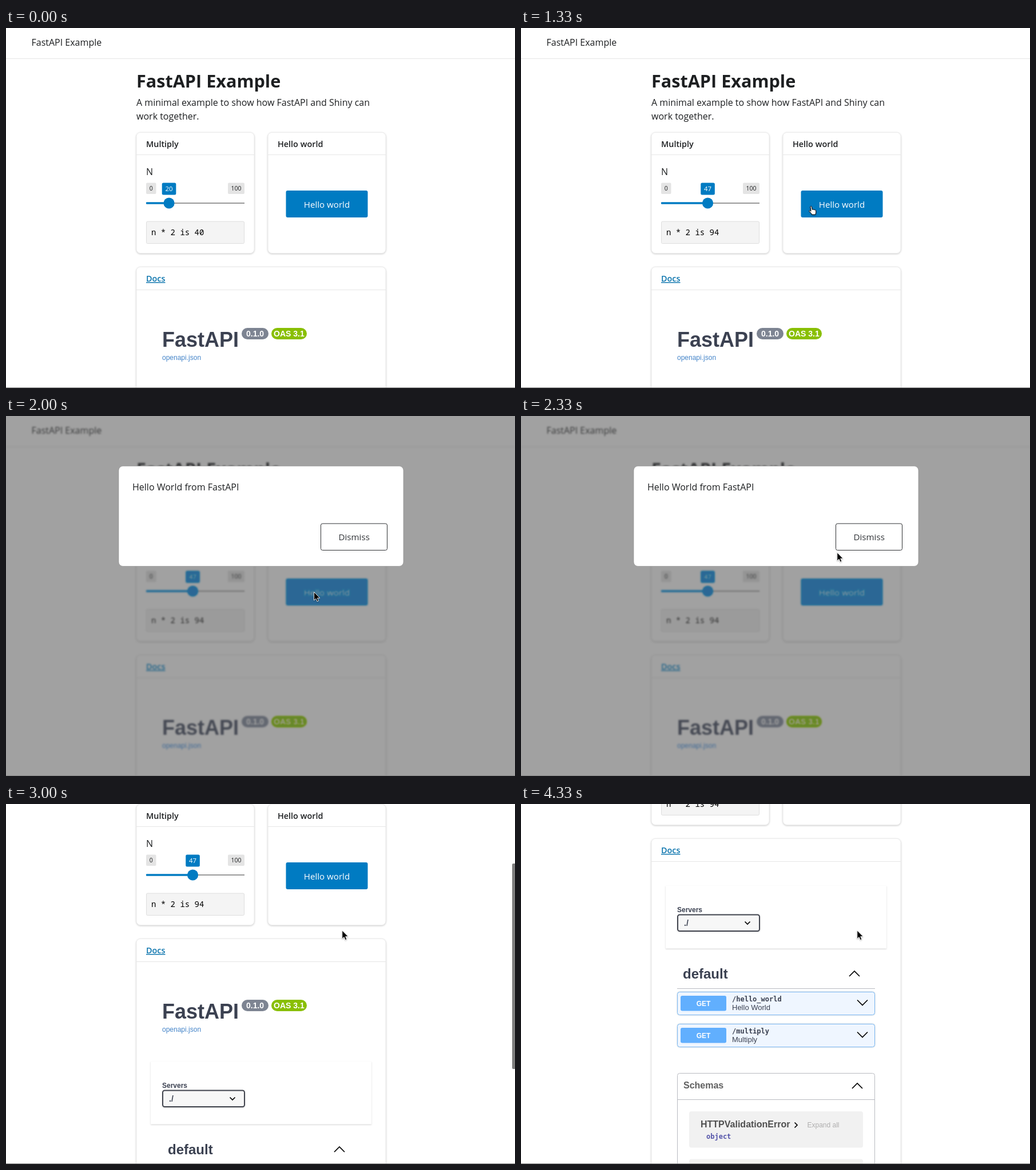
An HTML page for the animation above (5510 ms loop, 890 px wide and 629 px high).

```html
<!DOCTYPE html>
<html lang="en">
<head>
<meta charset="utf-8">
<title>FastAPI Example</title>
<style>
  html, body { margin: 0; width: 100%; height: 100%; overflow: hidden; background: #fff; }
  svg { position: absolute; left: 0; top: 0; width: 890px; height: 629px; }
  text { font: 16px "Open Sans", sans-serif; fill: #1d1f21; white-space: pre; }
  .title { font-size: 30.6px; font-weight: 700; }
  .head { font-size: 14.4px; font-weight: 600; }
  .button { font-size: 15.1px; font-weight: 500; text-anchor: middle; }
  .tick { font-size: 10.5px; text-anchor: middle; }
  .value { font-size: 11.4px; text-anchor: middle; }
  .white { fill: #fff; }
  .blue { fill: #007bc2; }
  .code { font: 14px "Noto Sans Mono", monospace; fill: #000; }
  .card { fill: #fff; stroke: #ebebeb; filter: drop-shadow(0 1.5px 1.5px rgba(0,0,0,.2)); }
  .rule { stroke: #e6e6e6; }
  .api text { font-family: "Liberation Sans", Arial, sans-serif; fill: #3b4151; }
  .api .b { font-weight: 700; }
  .api .white { fill: #fff; }
  .api .mono { font: 700 12px "DejaVu Sans Mono", monospace; }
  .s12 { font-size: 12px; }
  .s13 { font-size: 13px; }
  .s14 { font-size: 14px; }
  .box { fill: none; stroke: #b9bbc1; }
  .chevron { fill: none; stroke: #000; stroke-width: 1.7; }
  .raised { fill: #fff; filter: drop-shadow(0 1px 1px rgba(0,0,0,.18)); }
</style>
</head>
<body>
<svg id="page" viewBox="0 0 890 629">
  <rect width="890" height="629" fill="#fff"/>
  <g id="scroll">
    <text x="44.5" y="31">FastAPI Example</text>
    <path class="rule" d="M0 53.5H890"/>
    <text class="title" x="228" y="104">FastAPI Example</text>
    <text x="228" y="136.3">A minimal example to show how FastAPI and Shiny can</text>
    <text x="228" y="160.3">work together.</text>

    <rect class="card" x="228" y="182.5" width="206" height="211" rx="7"/>
    <path class="rule" d="M228 221.5H434"/>
    <text class="head" x="245" y="208">Multiply</text>
    <text x="245" y="256.5">N</text>
    <rect x="245" y="270.5" width="17.5" height="19.5" rx="2" fill="#e4e4e4"/>
    <text class="tick" x="253.8" y="283.7">0</text>
    <rect x="388" y="270.5" width="29" height="19.5" rx="2" fill="#e4e4e4"/>
    <text class="tick" x="402.5" y="283.7">100</text>
    <path d="M245 306H417" stroke="#777" stroke-width="1.5"/>
    <rect id="fill" class="blue" x="245" y="304.3" height="3.4" rx="1"/>
    <g id="knob">
      <circle class="blue" cy="306" r="9.6"/>
      <rect class="blue" x="-12.3" y="270.5" width="24.6" height="21" rx="2.5"/>
      <text class="value white" id="value" y="285"></text>
    </g>
    <rect x="245.5" y="338" width="171" height="38.5" rx="2" fill="#f4f4f4" stroke="#dedede"/>
    <text class="code" id="product" x="254" y="362"></text>

    <rect class="card" x="458" y="182.5" width="206" height="211" rx="7"/>
    <path class="rule" d="M458 221.5H664"/>
    <text class="head" x="475" y="208">Hello world</text>
    <rect class="blue" x="489.5" y="284" width="143" height="47" rx="3"/>
    <text class="button white" x="561" y="313.5">Hello world</text>

    <rect class="card" x="228" y="417.5" width="436" height="660" rx="7"/>
    <path class="rule" d="M228 457.5H664"/>
    <text class="head" x="245" y="443" style="fill:#0b74ad;text-decoration:underline">Docs</text>

    <clipPath id="frame"><rect x="245" y="474" width="402" height="588"/></clipPath>
    <g clip-path="url(#frame)">
      <g id="docs" class="api">
        <text class="b" x="273" y="557" style="font-size:36px">FastAPI</text>
        <rect x="412" y="524" width="47" height="20" rx="10" fill="#7d8492"/>
        <text class="b s14 white" x="420" y="539">0.1.0</text>
        <rect x="464" y="524" width="62" height="20" rx="10" fill="#89bf04"/>
        <text class="b s14 white" x="468" y="539">OAS 3.1</text>
        <text class="s12" x="273" y="580" style="fill:#4585c9">openapi.json</text>

        <g transform="translate(0 489)">
          <rect class="raised" x="253" y="143" width="386" height="109.5"/>
          <text class="b s12" x="273" y="189">Servers</text>
          <rect class="raised" x="274" y="193.5" width="143" height="28.5" rx="3.5" style="fill:#f7f7f7;stroke:#41444e;stroke-width:2"/>
          <text class="b s14" x="285" y="212.5">./</text>
          <path class="chevron" d="M391.5 205.5l4.5 4.5 4.5-4.5"/>

          <text class="b" x="283" y="305" style="font-size:24px">default</text>
          <path class="chevron" d="M574 301l9-9 9 9"/>
          <path class="box" d="M273 322.5H619"/>
          <g id="routes"></g>

          <rect class="box" x="273.5" y="470.5" width="345" height="300" rx="4"/>
          <path class="box" d="M273.5 516.5H618.5"/>
          <text class="b" x="284" y="497" style="fill:#606060">Schemas</text>
          <path class="chevron" d="M579 497l9-9 9 9"/>
          <rect x="294" y="537" width="304" height="63.5" rx="4" fill="#f1f1f1"/>
          <text class="b" x="314" y="565" style="fill:#505050">HTTPValidationError</text>
          <path class="chevron" d="M478.5 556.5l4.5 4.5-4.5 4.5"/>
          <text class="s12" x="500.5" y="565" style="fill:#afaeae">Expand all</text>
          <text class="mono" x="324" y="585" style="fill:#5555aa">object</text>
          <rect x="294" y="620.5" width="304" height="64" rx="4" fill="#f1f1f1"/>
        </g>
      </g>
    </g>
  </g>
</svg>

<svg viewBox="0 0 890 629">
  <rect id="backdrop" width="890" height="629" fill="#505050"/>
  <rect id="pageBar" x="885" width="6" height="359" rx="2" fill="#7f7f7f"/>
  <rect id="docsBar" x="638.5" width="6.5" height="490" rx="3.2" fill="#7f7f7f"/>
  <g id="modal">
    <rect x="197" y="87.5" width="498" height="175" rx="7.5" fill="#fff" stroke="#8f8f8f" stroke-width=".6"/>
    <text x="221" y="129.5">Hello World from FastAPI</text>
    <rect x="550.5" y="188" width="116" height="46.5" rx="3" fill="#fff" stroke="#2f3134"/>
    <text class="button" x="608.7" y="217" style="fill:#303337">Dismiss</text>
  </g>
  <path d="M0 628.5H890" stroke="#858585"/>
  <g id="cursor" style="filter:drop-shadow(0 1px 1px rgba(0,0,0,.3))">
    <path id="arrow" d="M0 0V14.5L3.3 11.5 5.5 16.6 8 15.5 5.9 10.6H10.4Z" fill="#000" stroke="#fff" stroke-width=".9"/>
    <path id="hand" d="M3 1.5c0-1.4 2.2-1.4 2.4 0l.9 5c.3-1 1.9-1 2.2.2.4-.9 1.8-.7 2.1.4.6-.7 1.8-.2 1.9.9l.3 3c0 1.5-.8 2.5-1 4H5.7C5 13 3 11.5 1.2 9.4.3 8.2 1.7 7.3 2.8 8.2L4 9.3Z" fill="#fff" stroke="#000"/>
  </g>
</svg>

<script>
const LOOP = 5510;
const $ = id => document.getElementById(id);

const route = (y, path, label) => `
  <g transform="translate(0 ${y})">
    <rect x="273.5" y=".5" width="345" height="40" rx="4" fill="#eff6ff" stroke="#79b7f2"
      style="filter:drop-shadow(0 0 1px rgba(0,0,0,.19))"/>
    <rect x="279" y="7" width="80" height="26.5" rx="3" fill="#61affe"/>
    <text class="b s12 white" x="319" y="24.5" text-anchor="middle">GET</text>
    <text class="mono" x="369" y="17">${path}</text>
    <text class="s13" x="369" y="32">${label}</text>
    <path class="chevron" d="M588 14.5l9 9 9-9"/>
  </g>`;
$("routes").innerHTML = route(328, "/hello_world", "Hello World") + route(384, "/multiply", "Multiply");

// Each step lists only what changes; everything else carries over.
const steps = [
  { at: 0, n: 20, cursor: null, hand: false, dim: 0, blur: 0, modal: false,
    scroll: 0, docs: 0, pageBar: 0, docsBar: 0 },
  { at: 330, cursor: [327, 534] },
  { at: 670, cursor: [363, 344] },
  { at: 1000, cursor: [280, 302], hand: true },
  { at: 1330, n: 47, cursor: [503, 311] },
  { at: 1670, cursor: [538.5, 307.5], hand: false, dim: .34 },
  { at: 2000, dim: .537, blur: 1.5, modal: true },
  { at: 2330, cursor: [552.8, 238.5] },
  { at: 2670, cursor: [589, 211.5], dim: .114, blur: 0, modal: false },
  { at: 3000, cursor: [587.8, 221], dim: 0, scroll: 182, pageBar: 1 },
  { at: 3330, scroll: 357, docs: 30, docsBar: 1 },
  { at: 3670, docs: 132, pageBar: .5 },
  { at: 4000, pageBar: 0, docsBar: .5 },
  { at: 4330, docsBar: 0 },
];

const move = (id, x, y) => $(id).setAttribute("transform", `translate(${x} ${y})`);
const show = (id, visible) => $(id).style.display = visible ? "" : "none";

function draw(time) {
  const s = Object.assign({}, ...steps.filter(step => step.at <= time));

  const knobX = 254.3 + s.n * 1.537;
  move("knob", knobX, 0);
  $("fill").setAttribute("width", knobX - 245);
  $("value").textContent = s.n;
  $("product").textContent = `n * 2 is ${s.n * 2}`;

  move("scroll", 0, -s.scroll);
  move("docs", 0, -s.docs);
  $("pageBar").setAttribute("y", s.scroll * .571);
  $("pageBar").style.opacity = s.pageBar;
  $("docsBar").setAttribute("y", 474 - s.scroll + s.docs * .83);
  $("docsBar").style.opacity = s.docsBar;

  $("page").style.filter = s.dim > .2 ? `blur(${s.blur}px) saturate(1.4)` : "none";
  $("backdrop").style.opacity = s.dim;
  show("modal", s.modal);

  show("cursor", s.cursor);
  if (s.cursor) move("cursor", ...s.cursor);
  show("hand", s.hand);
  show("arrow", !s.hand);
}

const start = performance.now();
function tick() {
  draw((performance.now() - start) % LOOP);
  requestAnimationFrame(tick);
}
tick();
</script>
</body>
</html>
```
